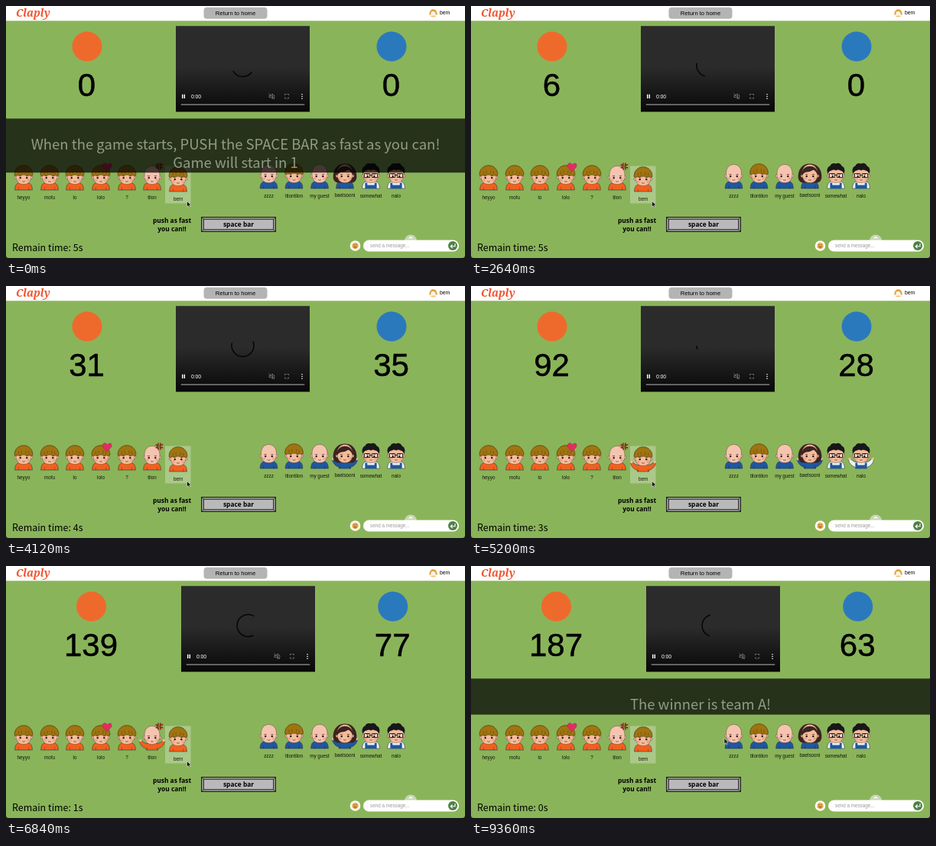
Recreate the animation shown at these times as an HTML page. Size 600 by 330 pixels, loop 9.4 s.

```html
<!DOCTYPE html>
<html lang="en">
<head>
<meta charset="utf-8">
<title>Cheering game</title>
<style>
  html, body { margin: 0; width: 100%; height: 100%; overflow: hidden; background: #8ab45a; }
  svg { display: block; width: 100vw; height: 100vh; }
  text { font-family: "Liberation Sans", Arial, sans-serif; }
  .mid { text-anchor: middle; }
  .score { font-size: 42px; stroke: #000; stroke-width: .5; }
  .label { font-size: 6.3px; fill: #10160a; }
  .bold { font: 700 8.4px "Open Sans", sans-serif; }
  .round { font-family: "Noto Sans CJK KR", "Noto Sans CJK JP", "Noto Sans CJK", sans-serif; }
  .notice { font-size: 18.5px; fill: #929b88; }
</style>
</head>
<body>
<svg id="stage" viewBox="0 0 600 330" preserveAspectRatio="none"></svg>
<script>
const LOOP = 9400, START = 2290, END = 7290;
const stage = document.getElementById('stage');

// dy shifts a figure, cheer is the time window with raised arms
const people = [
  { name: 'heyyo', x: 23, hair: 'bowl' },
  { name: 'mofu', x: 57, hair: 'bowl' },
  { name: 'lo', x: 90, hair: 'bowl' },
  { name: 'lolo', x: 124, hair: 'bowl', mood: 'heart' },
  { name: '?', x: 158, hair: 'bowl' },
  { name: 'tilon', x: 191, hair: 'bald', mood: 'anger', cheer: [5900, END] },
  { name: 'bem', x: 225, hair: 'bowl', dy: 2, cheer: [4400, 5700] },
  { name: 'zzzz', x: 343.5, hair: 'bald', blue: 1 },
  { name: 'tilontilon', x: 376.5, hair: 'bowl', blue: 1 },
  { name: 'my guest', x: 410, hair: 'bald', blue: 1 },
  { name: 'baelsooni', x: 443, hair: 'bob', blue: 1, cheer: [3100, END] },
  { name: 'somewhat', x: 477, hair: 'curly', blue: 1 },
  { name: 'nalo', x: 510, hair: 'curly', blue: 1, cheer: [4600, 5900] }
];

const hairs = {
  bald: '',
  bowl: `<path d="M-12.500 0C-13 -17 13 -17 12.500 0Q11 1.500 9.500 .5Q0 -1.500 -9.500 .5Q-11 1.500 -12.500 0Z" fill="#a07410" stroke="#4d370c" stroke-width=".7"/>
    <path d="M-7 -1V-5M-3 -2V-6M3 -2V-6M7 -1V-5" stroke="#6f4e0c" stroke-width=".7"/>`,
  bob: '<path d="M-11 3C-13 -14 13 -14 11 3Q9 -3 5 -5Q0 -2 -5 -2Q-9 -1 -11 3Z" fill="#3b2320"/>',
  curly: '<path d="M-11 0C-14 -5 -10 -10 -8 -10C-6 -15 -1 -13 0 -13C3 -15 7 -13 8 -10C12 -9 13 -3 11 0Q9 -4 6 -4Q3 -6 0 -4Q-3 -6 -6 -4Q-9 -4 -11 0Z" fill="#17171a"/>'
};
const bobBack = '<path d="M0 -13C13 -13 17 -2 16 6Q15 12 8 12H-8Q-15 12 -16 6C-17 -2 -13 -13 0 -13Z" fill="#3b2320"/>';

const moods = {
  heart: '<path d="M8 -5C2 -10 1 -13 4 -15.500Q7 -16.500 9 -13.500Q11 -16.500 14 -15C16 -12 14 -9 8 -5Z" fill="#e32c62" stroke="#9b1d45" stroke-width=".5"/>',
  anger: '<path d="M5 -14L8 -12L8.500 -16M15 -14L11 -12.500L11.500 -16M5 -9.500L8 -10.500L8.500 -7M15 -9.500L11 -10.500L11.500 -7" fill="none" stroke="#8e211b" stroke-width="1.700"/>'
};

function body(p, up) {
  const main = p.blue ? '#1d57a3' : '#f2601f';
  const shirt = p.hair === 'curly' ? '#eef0f2' : main;
  const shape = up
    ? 'M-8 19.500V18Q-16 15 -17.500 8L-14.500 7Q-11 11 -7 11H7Q11 11 14.500 7L17.500 8Q16 15 8 18V19.500Z'
    : 'M-12 19.500Q-12 11 -6 10H6Q12 11 12 19.500Z';
  const bib = p.hair === 'curly'
    ? `<path d="M-8 19.500V12H-5V15H5V12H8V19.500Z" fill="${main}"/>`
    : '<path d="M-7 19.500V16M7 19.500V16" stroke="#0006" stroke-width=".7"/>';
  const hands = up ? '<circle cx="-16" cy="7" r="1.800" fill="#f3bd9c"/><circle cx="16" cy="7" r="1.800" fill="#f3bd9c"/>' : '';
  return `<path d="${shape}" fill="${shirt}" stroke="#35353a" stroke-width=".6"/>${bib}${hands}`;
}

function person(p, i) {
  const skin = p.hair === 'bald' ? '#f5c4b0' : '#f3bd9c';
  const y = (p.blue ? 219.5 : 221.5) + (p.dy || 0);
  const labelY = p.blue ? (p.hair === 'bob' ? 250 : 251.3) : 253.3 + (p.dy || 0);
  const glasses = p.hair === 'curly'
    ? '<path d="M-9 0H-1.500V5H-9ZM1.500 0H9V5H1.500ZM-1.500 2H1.500" fill="#fff8" stroke="#222"/>' : '';
  return `<g transform="translate(${p.x} ${y}) scale(.95 1)">
    <g id="rest${i}">${body(p, false)}</g>
    ${p.cheer ? `<g id="cheer${i}">${body(p, true)}</g>` : ''}
    ${p.hair === 'bob' ? bobBack : ''}
    <g stroke="#6b4536" stroke-width=".5" fill="${skin}">
      <circle cx="-10.500" cy="3" r="2"/><circle cx="10.500" cy="3" r="2"/>
      <path d="M-10.500 0C-11 -16 11 -16 10.500 0C10.500 9 6 12 0 12S-10.500 9 -10.500 0Z"/>
    </g>
    <circle cx="-6.500" cy="6.500" r="2" fill="#f0917f" opacity=".6"/><circle cx="6.500" cy="6.500" r="2" fill="#f0917f" opacity=".6"/>
    ${glasses}
    <circle cx="-4.500" cy="3.500" r="1.300" fill="#231815"/><circle cx="4.500" cy="3.500" r="1.300" fill="#231815"/>
    <path d="M-6.500 1H-3M3 1H6.500M-2 8Q0 9.500 2 8" fill="none" stroke="#56331f" stroke-width=".7"/>
    ${hairs[p.hair]}${moods[p.mood] || ''}
  </g>
  <text class="label mid" x="${p.x}" y="${labelY}">${p.name}</text>`;
}

const team = (id, x, color) => `<g id="${id}">
  <circle cx="${x}" cy="53" r="19.500" fill="${color}"/>
  <text id="${id}Score" class="score mid" x="${x - .5}" y="117.500">0</text></g>`;

const video = `<g id="video">
  <rect x="222" y="26.200" width="175" height="112.200" fill="#2b2b2b"/>
  <rect x="222" y="80" width="175" height="58.400" fill="url(#shade)"/>
  <path id="spinner" fill="none" stroke="#050505" stroke-width="1.500"/>
  <path d="M230.700 115.800V121M233.300 115.800V121" stroke="#fff" stroke-width="1.400"/>
  <text x="242" y="120.500" fill="#fff" style="font:6.800px Roboto,sans-serif">0:00</text>
  <g fill="none" stroke="#777" stroke-width=".9">
    <path d="M344 117H346L348.500 115V121.500L346 119.500H344ZM350 116Q352 118.500 350 121M343.500 114.500L351 122"/>
    <path d="M364.500 117V115.500H366.500M367.500 115.500H369.500V117M369.500 119.500V121H367.500M366.500 121H364.500V119.500"/>
  </g>
  <g fill="#fff"><circle cx="387" cy="115.800" r=".8"/><circle cx="387" cy="118.500" r=".8"/><circle cx="387" cy="121.200" r=".8"/></g>
  <rect x="228.500" y="128.300" width="162" height="1.600" rx=".8" fill="#707070"/>
</g>`;

const header = `<rect width="600" height="19.400" fill="#fff"/>
  <text x="13" y="13.800" fill="#f0532d" style="font:italic 800 13.800px 'Noto Serif',serif">Claply</text>
  <rect x="258.500" y="1.800" width="83" height="15" rx="4" fill="#b4b4b4"/>
  <text class="mid" x="300" y="11.800" font-size="7.600">Return to home</text>
  <circle cx="558.500" cy="9.500" r="5" fill="#fbf3e6"/>
  <path d="M553.500 12A5.200 6 0 1 1 563.500 12L561.500 11Q562 7.500 558.500 7T555.500 11Z" fill="#e2a33c"/>
  <path d="M554.500 14Q558.500 11.500 562.500 14Z" fill="#f2b05c"/>
  <text x="567" y="11.300" font-size="6.800">bem</text>`;

const spaceBar = `<text class="bold mid" x="217" y="284">push as fast</text>
  <text class="bold mid" x="217" y="295.300">you can!!</text>
  <rect x="255.500" y="276.500" width="97" height="19" fill="#8d8d8d" stroke="#222"/>
  <path d="M256 277L259 280M352 277L349 280M256 295L259 292M352 295L349 292" stroke="#222" stroke-width=".8"/>
  <rect x="258.500" y="279.300" width="91" height="13.400" fill="#b9b9b9" stroke="#222" stroke-width=".8"/>
  <text class="bold mid" x="304" y="289">space bar</text>`;

const chat = `<path d="M521 307A8 7.500 0 0 1 537 307Z" fill="#c9d6b6"/>
  <path d="M526.500 304.500L529 302.300L531.500 304.500" fill="none" stroke="#fff" stroke-width="1.100"/>
  <circle cx="456.500" cy="314" r="6.800" fill="#fff"/>
  <circle cx="456.500" cy="314" r="4.300" fill="#eeb04e"/>
  <path d="M454 314.500H459Q458.700 317 456.500 317T454 314.500Z" fill="#b5713a"/>
  <circle cx="455" cy="312.700" r=".6" fill="#5b3514"/><circle cx="458" cy="312.700" r=".6" fill="#5b3514"/>
  <rect x="467" y="306.500" width="125" height="15" rx="7.500" fill="#fff"/>
  <text x="476" y="316.300" font-size="6.300" fill="#999">send a message...</text>
  <circle cx="584" cy="314" r="6" fill="#4e7f45"/>
  <path d="M587 311V314.800H581.500M583.500 312.500L581.200 314.800L583.500 317" fill="none" stroke="#fff" stroke-width="1.100"/>`;

stage.innerHTML = `<defs><linearGradient id="shade" x2="0" y2="1">
    <stop stop-color="#000" stop-opacity="0"/><stop offset="1" stop-color="#000" stop-opacity=".82"/>
  </linearGradient></defs>
  <rect width="600" height="330" fill="#8ab45a"/>
  ${header}${team('left', 106, '#ee6a2c')}${team('right', 504, '#2b79bd')}${video}
  <rect x="208" y="209.500" width="33.500" height="49" fill="#fff" opacity=".27"/>
  ${people.map(person).join('')}
  ${spaceBar}${chat}
  <text id="remain" class="round" x="8" y="321" font-size="12.450"></text>
  <path d="M0 326Q0 330 4 330H0ZM600 326Q600 330 596 330H600Z" fill="#2a3220"/>
  <rect id="veil" y="147.400" width="600" fill="#000" opacity=".72"/>
  <text id="line1" class="round notice mid" x="300" y="188"></text>
  <text id="line2" class="round notice mid" x="300" y="212"></text>
  <path id="cursor" d="M0 0V7.500L1.800 6L3 8.600L4.200 8L3 5.500H5.400Z" fill="#111" stroke="#fff" stroke-width=".5"/>`;

const $ = id => document.getElementById(id);
const clamp = v => Math.max(0, Math.min(1, v));
const show = (el, on) => el.setAttribute('visibility', on ? 'visible' : 'hidden');
const move = (el, x, y = 0) => el.setAttribute('transform', `translate(${x} ${y})`);

// cubic-bezier(.4, 0, .2, 1)
function ease(x) {
  let lo = 0, hi = 1, s = .5;
  for (let i = 0; i < 20; i++) {
    s = (lo + hi) / 2;
    const bx = 1.2 * s * (1 - s) ** 2 + .6 * s * s * (1 - s) + s ** 3;
    if (bx < x) lo = s; else hi = s;
  }
  return s * s * (3 - 2 * s);
}

function along(points, t) {
  let [t0, v0] = points[0];
  for (const [t1, v1] of points) {
    if (t < t1) return Math.round(v0 + (v1 - v0) * clamp((t - t0) / (t1 - t0)));
    [t0, v0] = [t1, v1];
  }
  return v0;
}

const scoreA = [[START, 0], [2640, 6], [4120, 31], [5200, 92], [6840, 139], [END, 187]];
const scoreB = [[2640, 0], [4120, 35], [5200, 28], [6840, 77], [END, 63]];

// Arc grows and shrinks in half steps while the whole ring turns.
function spinner(t) {
  const k = (t + 205) / 666.5, step = Math.floor(k), x = k - step, e = ease(x);
  const len = 10 + 270 * (step % 2 ? 1 - e : e);
  const mid = 45 + 360 * t / 1568 + 135 * (step + (x + e) / 2);
  const at = deg => {
    const a = deg * Math.PI / 180;
    return `${(309.5 + 14.5 * Math.cos(a)).toFixed(2)} ${(78 + 14.5 * Math.sin(a)).toFixed(2)}`;
  };
  return `M${at(mid - len / 2)}A14.5 14.5 0 ${len > 180 ? 1 : 0} 1 ${at(mid + len / 2)}`;
}

function draw(t) {
  const a = along(scoreA, t), wide = a > 99;
  $('leftScore').textContent = a;
  $('rightScore').textContent = along(scoreB, t);
  move($('left'), wide ? 5.5 : 0);
  move($('video'), wide ? 7 : 0);
  move($('right'), wide ? 1.7 : 0);
  $('spinner').setAttribute('d', spinner(t));

  const left = 5 - Math.max(0, Math.min(5, Math.floor((t - START) / 1000)));
  $('remain').textContent = `Remain time: ${left}s`;

  const before = t < START, after = t >= END;
  show($('veil'), before || after);
  $('veil').setAttribute('height', before ? 70.8 : 47.2);
  $('line1').textContent = before ? 'When the game starts, PUSH the SPACE BAR as fast as you can!'
    : after ? 'The winner is team A!' : '';
  $('line2').textContent = before ? `Game will start in ${t < START - 1000 ? 1 : 0}` : '';

  people.forEach((p, i) => {
    if (!p.cheer) return;
    const up = t >= p.cheer[0] && t < p.cheer[1];
    show($('rest' + i), !up);
    show($('cheer' + i), up);
  });

  const c = ease(clamp((t - 7900) / 900));
  move($('cursor'), 236.5 + 94.5 * c, 255.5 - 30 * c);
}

const begin = performance.now();
function tick() {
  draw((performance.now() - begin) % LOOP);
  requestAnimationFrame(tick);
}
tick();
</script>
</body>
</html>
```
